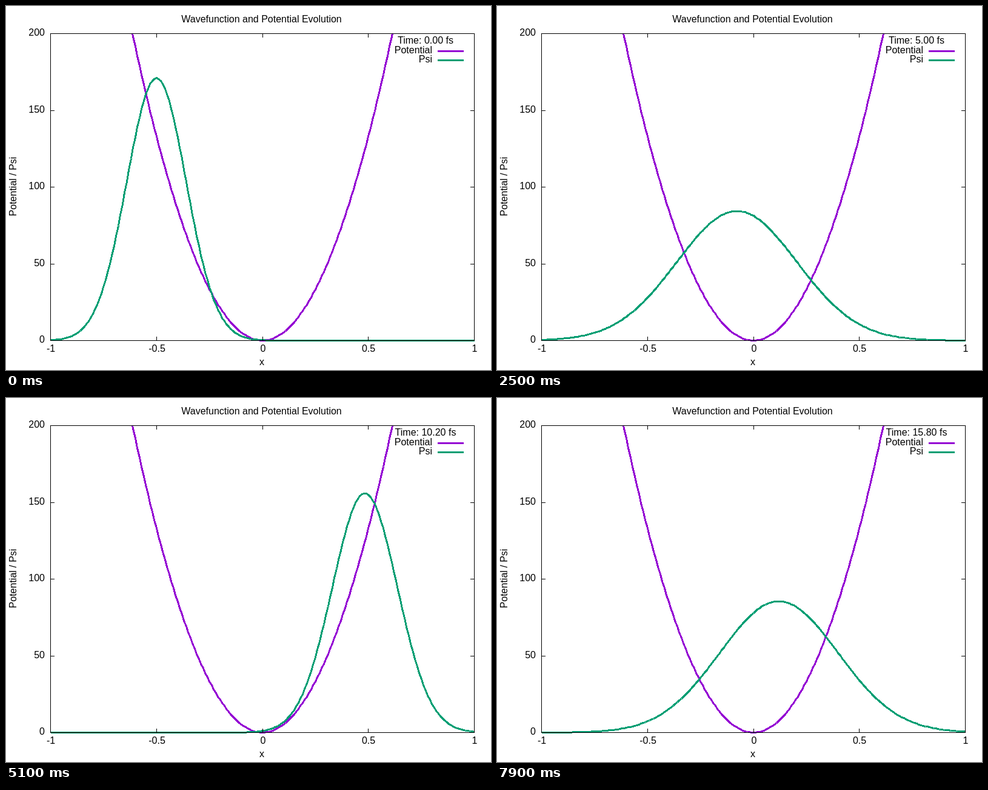
An HTML page that plays this animation: 800x600 px, repeating every 8 s.

```html
<!DOCTYPE html>
<html lang="en">
<head>
<meta charset="utf-8">
<title>Wavefunction and Potential Evolution</title>
<style>
  html, body { margin: 0; width: 100%; height: 100%; overflow: hidden; background: #fff; }
  svg { display: block; }
  text { font: 16px "Liberation Sans", Arial, sans-serif; }
  .mid { text-anchor: middle; }
  .end { text-anchor: end; }
  path { fill: none; shape-rendering: crispEdges; }
  .curve { stroke-width: 3; stroke-linejoin: round; }
  .potential { stroke: #9400d3; }
  .psi { stroke: #009e73; }
  #axes { stroke: #000; }
</style>
</head>
<body>
<svg width="800" height="600" viewBox="0 0 800 600">
  <clipPath id="plot"><rect x="72" y="45" width="701" height="508"/></clipPath>
  <text class="mid" x="421.5" y="27">Wavefunction and Potential Evolution</text>
  <text class="mid" x="422" y="592">x</text>
  <text class="mid" transform="translate(17 297.5) rotate(-90)">Potential / Psi</text>
  <g id="labels"></g>
  <text class="mid" id="time" x="692" y="62"></text>
  <text class="end" x="703" y="78">Potential</text>
  <text class="end" x="703" y="93">Psi</text>
  <path class="curve potential" d="M712 74.5H755"/>
  <path class="curve psi" d="M712 89.5H755"/>
  <g clip-path="url(#plot)">
    <path class="curve potential" id="potential"/>
    <path class="curve psi" id="psi"/>
  </g>
  <path id="axes"/>
</svg>
<script>
const $ = id => document.getElementById(id);
const px = x => Math.round(73 + (x + 1) * 349.5) + 0.5;
const py = y => Math.round(551 - y * 2.53) + 0.5;

function plot(fn) {
  const points = [];
  for (let i = -100; i <= 100; i++) points.push(px(i / 100) + ' ' + py(fn(i / 100)));
  return 'M' + points.join('L');
}

function drawAxes() {
  let d = 'M73.5 45.5H772.5V551.5H73.5Z', labels = '';
  for (let i = 0; i < 5; i++) {
    const x = i / 2 - 1, y = i * 50;
    d += `M${px(x)} 551v-6M${px(x)} 46v6M74 ${py(y)}h6M772 ${py(y)}h-6`;
    labels += `<text class="mid" x="${px(x) + 0.5}" y="570">${x}</text>` +
              `<text class="end" x="64" y="${py(y) + 3.5}">${y}</text>`;
  }
  $('axes').setAttribute('d', d);
  $('labels').innerHTML = labels;
}

// Gaussian packet swinging and breathing in a harmonic well
const OMEGA = 0.2829, START = -0.5, VAR_MIN = 0.0196, VAR_MAX = 0.082, AREA = 60;

function drawPsi(fs) {
  const c = Math.cos(OMEGA * fs);
  const variance = VAR_MAX + (VAR_MIN - VAR_MAX) * c * c;
  const peak = AREA / Math.sqrt(2 * Math.PI * variance);
  $('psi').setAttribute('d', plot(x => peak * Math.exp(-((x - START * c) ** 2) / (2 * variance))));
  $('time').textContent = `Time: ${fs.toFixed(2)} fs`;
}

let shown = -1;
function frame() {
  const step = Math.floor(performance.now() % 8000 / 100);
  if (step !== shown) drawPsi((shown = step) * 0.2);
  requestAnimationFrame(frame);
}

drawAxes();
$('potential').setAttribute('d', plot(x => 532.5 * x * x));
frame();
</script>
</body>
</html>
```
